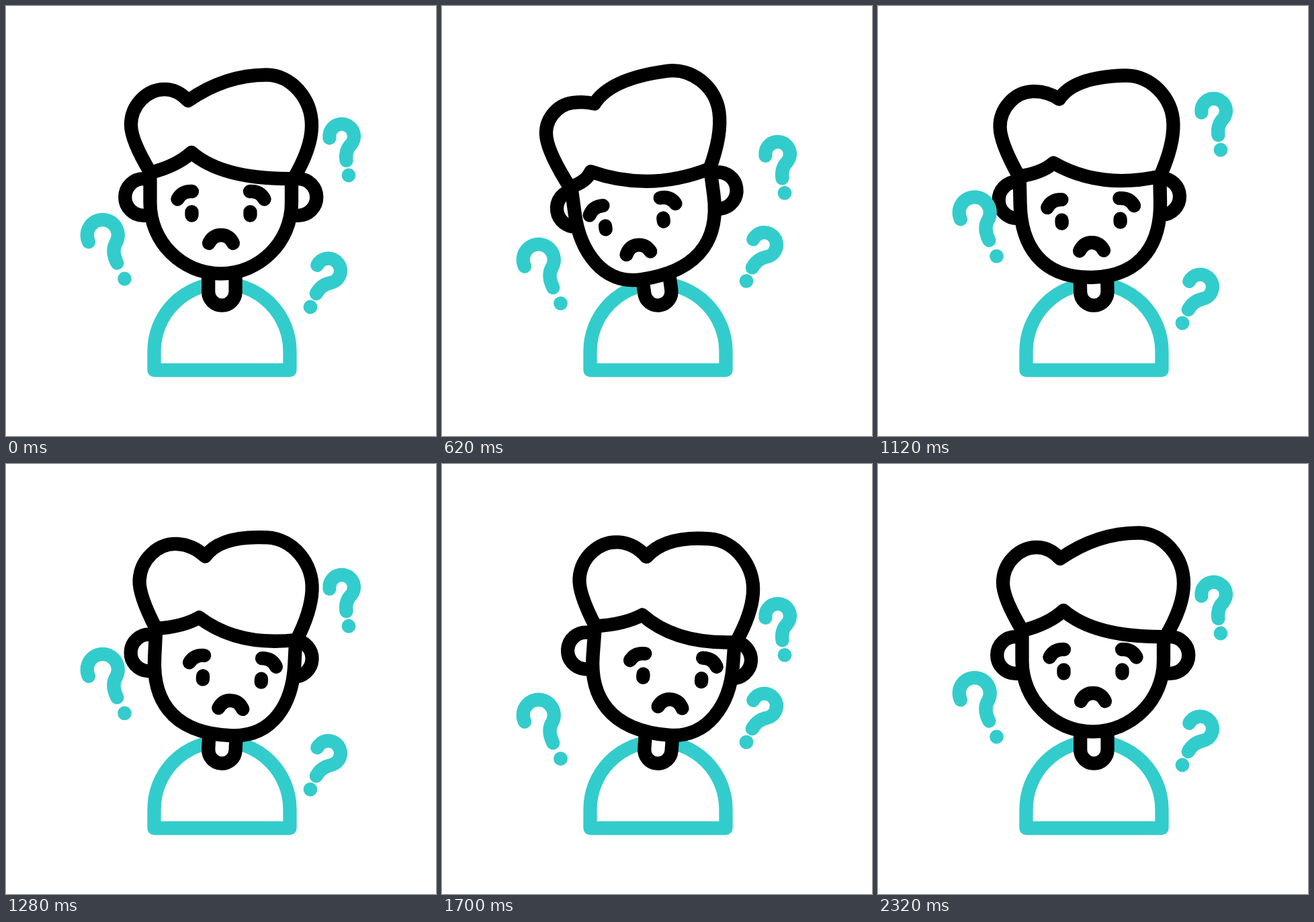
Write an HTML page with a canvas that moves like this. It is 640 by 640 pixels and loops after 2400 ms.

```html
<!DOCTYPE html>
<html lang="en">
<head>
<meta charset="utf-8">
<title>Puzzled person</title>
<style>
  html, body { margin: 0; width: 100%; height: 100%; overflow: hidden; background: #fff; }
  canvas { display: block; width: 640px; height: 640px; }
</style>
</head>
<body>
<canvas id="stage" width="640" height="640"></canvas>
<script>
const ctx = document.getElementById('stage').getContext('2d');
const LOOP = 2400, STEP = 20;
const BLACK = '#000', TEAL = '#33cccc', WHITE = '#fff';
const PIVOT = { x: 320.5, y: 426 };

// Motion tracks: [time, value] pairs, eased between neighbours.
const lookLeft = [[0, 0], [740, 1], [1480, 0]];
const lookRight = [[740, 0], [1480, 1], [2260, 0]];
const marks = [
  {
    track: [[0, 0], [700, 38], [1200, -39], [1785, 37], [2320, 0]],
    path: new Path2D('M123 351 A23 23 0 1 1 164.5 351 C158 361 160 372 165.3 382.5'),
    dot: [176.5, 406]
  },
  {
    track: [[0, 0], [500, 36], [1045, -42], [1587, 36], [2155, 0]],
    path: new Path2D('M481.5 196.5 A18.3 18.3 0 1 1 513.5 206 Q504.5 215 506.5 230'),
    dot: [510, 252]
  },
  {
    track: [[0, 0], [700, -40], [1265, 36.5], [1790, -40], [2320, 0]],
    path: new Path2D('M463.3 385.8 A18.3 18.3 0 1 1 483 412 Q469 415 461.8 428'),
    dot: [453, 448]
  }
];

// Hair key points: position, then the shift when looking left and right.
const hair = {
  rootLeft: [[215, 248], [-3, 6], [0, 1]],
  sideLeft: [[186, 177], [2, -2], [0, 3]],
  bump: [[236, 124], [-3, 6], [5, -3]],
  parting: [[271, 141], [-6, -6], [15, -1]],
  crown: [[388, 102.5], [-10, -1], [-16, 5]],
  sideRight: [[455, 178], [-8, -6], [-12, 6]],
  rootRight: [[428, 257], [-6, -3], [-3, 0]],
  fringe: [[323, 258.5], [6, 20], [17, 11]],
  tip: [[276, 218], [-32, 18], [9, 11]]
};

const body = new Path2D('M220.5 542 V514 A101 101 0 0 1 422.5 514 V542 Z');
const neck = new Path2D('M301.2 392 V425.5 A20.2 20.2 0 0 0 341.6 425.5 V392');
const earLeft = new Path2D('M214 257.2 H204.5 A27.3 27.3 0 0 0 204.5 311.8 H214');
const earRight = new Path2D('M425 257.2 H435 A27.3 27.3 0 0 1 435 311.8 H425');
const features = new Path2D(
  'M276.5 306.5 V311.5 M363.5 306.5 V311.5' +
  'M255.5 287.5 C260 279 267 275.5 277 276' +
  'M363 276 C373 275.5 380 279 384.5 287.5' +
  'M302 353 Q308 341 320 341 Q332 341 338 353');

function valueAt(track, t) {
  if (t <= track[0][0]) return track[0][1];
  for (let i = 1; i < track.length; i++) {
    const [t0, v0] = track[i - 1], [t1, v1] = track[i];
    if (t < t1) {
      const u = (t - t0) / (t1 - t0);
      return v0 + (v1 - v0) * u * u * (3 - 2 * u);
    }
  }
  return track[track.length - 1][1];
}

const lerp = (a, b, u) => [a[0] + (b[0] - a[0]) * u, a[1] + (b[1] - a[1]) * u];

function outline(path, color, fill) {
  if (fill) {
    ctx.fillStyle = fill;
    ctx.fill(path);
  }
  ctx.strokeStyle = color;
  ctx.stroke(path);
}

function shifted(dx, dy, draw) {
  ctx.save();
  ctx.translate(dx, dy);
  draw();
  ctx.restore();
}

function hairPath(left, right) {
  const p = {};
  for (const [name, [at, l, r]] of Object.entries(hair)) {
    p[name] = at.map((v, i) => v + l[i] * left + r[i] * right);
  }
  const path = new Path2D();
  const bend = (control, end) => path.quadraticCurveTo(...control, ...end);
  const quarter = (start, corner, end) =>
    path.bezierCurveTo(...lerp(start, corner, 0.54), ...lerp(end, corner, 0.54), ...end);
  // Control points level with (or straight below) a smooth key point.
  const level = (from, to, u) => [from[0] + (to[0] - from[0]) * u, from[1]];
  const below = (from, to, u) => [from[0], from[1] + (to[1] - from[1]) * u];

  path.moveTo(...p.rootLeft);
  bend(below(p.sideLeft, p.rootLeft, 0.32), p.sideLeft);
  quarter(p.sideLeft, [p.sideLeft[0], p.bump[1]], p.bump);
  bend(level(p.bump, p.parting, 0.56), p.parting);
  bend(level(p.crown, p.parting, 0.53 + 0.24 * (left + right)), p.crown);
  quarter(p.crown, [p.sideRight[0], p.crown[1]], p.sideRight);
  bend(below(p.sideRight, p.rootRight, 0.42), p.rootRight);
  bend(p.fringe, p.tip);
  const middle = lerp(p.tip, p.rootLeft, 0.5);
  bend([middle[0] + 9, middle[1] + 5], p.rootLeft);
  path.closePath();
  return path;
}

// The jaw grows squarer as the chin swings to either side.
function facePath(left, right) {
  const turn = left + right;
  const x0 = 214.5, x1 = 425 - 2 * turn, cheekY = 293, handle = 58;
  const jaw = 47.3 - 21 * turn;
  const chinX = 319.75 - 23.5 * left + 21 * right;
  const chinY = 398.4 + 6 * left + 5 * right;
  const path = new Path2D();
  path.moveTo(x0, 248);
  path.lineTo(x0, cheekY);
  path.bezierCurveTo(x0, cheekY + handle, x0 + jaw, chinY, chinX, chinY);
  path.bezierCurveTo(x1 - jaw, chinY, x1, cheekY + handle, x1, cheekY);
  path.lineTo(x1, 256);
  return path;
}

function drawHead(t) {
  const left = valueAt(lookLeft, t), right = valueAt(lookRight, t);
  const mix = (l, r) => l * left + r * right;
  ctx.save();
  ctx.translate(PIVOT.x, PIVOT.y);
  ctx.rotate(mix(-8.3, 5.25) * Math.PI / 180);
  ctx.translate(-PIVOT.x, -PIVOT.y);
  outline(neck, BLACK, WHITE);
  shifted(mix(12.5, -1), mix(1.6, 2), () => outline(earLeft, BLACK, WHITE));
  shifted(mix(-4.5, -15.5), mix(4, -1), () => outline(earRight, BLACK, WHITE));
  outline(facePath(left, right), BLACK, WHITE);
  shifted(mix(-21, 18.3), mix(12.3, 10), () => outline(features, BLACK));
  outline(hairPath(left, right), BLACK, WHITE);
  ctx.restore();
}

function drawMark({ track, path, dot }, t) {
  shifted(0, valueAt(track, t), () => {
    outline(path, TEAL);
    ctx.fillStyle = TEAL;
    ctx.beginPath();
    ctx.arc(...dot, 10.4, 0, Math.PI * 2);
    ctx.fill();
  });
}

function render() {
  const t = Math.floor(performance.now() % LOOP / STEP) * STEP;
  ctx.fillStyle = WHITE;
  ctx.fillRect(0, 0, 640, 640);
  ctx.lineWidth = 20.3;
  ctx.lineCap = ctx.lineJoin = 'round';
  outline(body, TEAL, WHITE);
  drawHead(t);
  marks.forEach(mark => drawMark(mark, t));
  requestAnimationFrame(render);
}
render();
</script>
</body>
</html>
```
